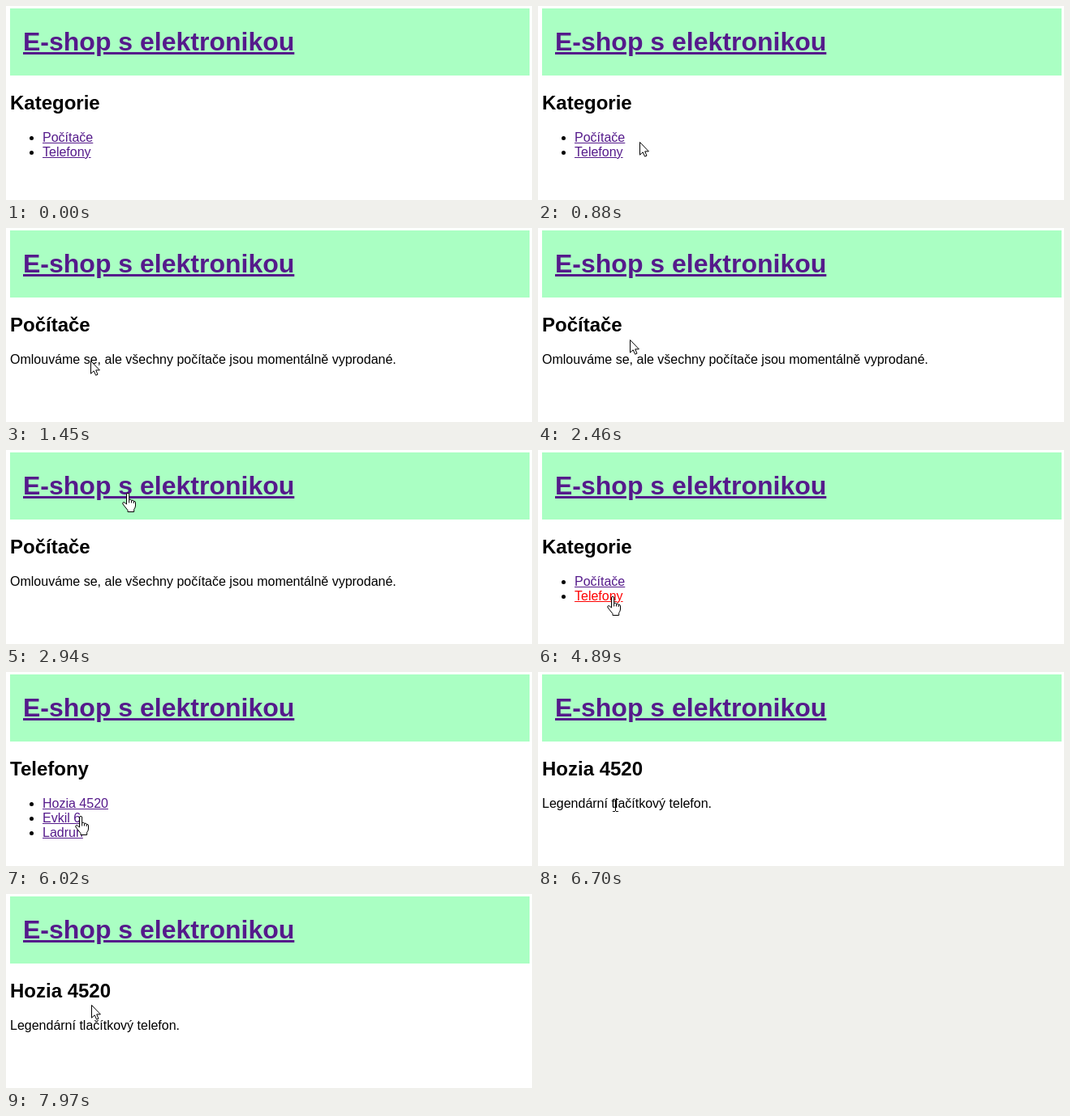
Recreate the animation shown at these times as an HTML page. Size 648x240 px, loop 8 s.

```html
<!DOCTYPE html>
<html lang="cs">
<head>
<meta charset="utf-8">
<title>E-shop</title>
<style>
  html, body { margin: 0; width: 100%; height: 100%; overflow: hidden; background: #fff; }
  #stage { position: relative; width: 648px; height: 240px; overflow: hidden;
    font: 16px/18px "Liberation Sans", Arial, sans-serif; color: #000; cursor: default; }
  #stage > * { position: absolute; margin: 0; white-space: nowrap; }
  header { left: 5px; top: 3px; width: 640px; height: 83px; background: #aaffc3; }
  h1 { left: 21px; top: 26px; font-size: 32px; line-height: 36px; }
  h2 { left: 5px; top: 106px; font-size: 24px; line-height: 27px; }
  #body { left: 5px; top: 154px; }
  ul { margin: 0; padding-left: 40px; }
  a { color: #551a8b; text-decoration: underline; }
  a.active { color: #f00; }
  svg { left: 0; top: 0; }
</style>
</head>
<body>
<div id="stage">
  <header></header>
  <h1><a id="home">E-shop s elektronikou</a></h1>
  <h2 id="heading"></h2>
  <div id="body"></div>
  <svg width="648" height="240" stroke="#000" fill="#fff">
    <g id="arrow">
      <path d="M.5 .5V16.2L4.2 12.8L6.6 18.2L9 17.2L6.7 11.9H11.4Z"/>
    </g>
    <g id="hand" stroke-linejoin="round">
      <path d="M5.5 14V2a1.6 1.6 0 0 1 3.2 0V8.5q2.4-1 2.8.8q2.4-.7 2.7 1q2.3-.3 2.3 1.7V16q0 2-1.8 4.5V23.5H7V21.5L1 14q-1-2 1-2.4q1.5 0 3.5 2.6Z"/>
      <path d="M8.7 8.5V12.5M11.5 9.5V12.5M14.2 10.5V13" fill="none"/>
    </g>
    <g id="beam" fill="none">
      <path d="M-3 -7.5H0M1 -7.5H4M.5 -7V7M-3 7.5H0M1 7.5H4"/>
    </g>
  </svg>
</div>
<script>
const LOOP = 8000;
const $ = id => document.getElementById(id);
const list = items => `<ul>${items.map(s => `<li><a>${s}</a></li>`).join('')}</ul>`;

const pages = {
  home: { title: 'Kategorie', links: ['Počítače', 'Telefony'] },
  computers: { title: 'Počítače', text: 'Omlouváme se, ale všechny počítače jsou momentálně vyprodané.' },
  phones: { title: 'Telefony', links: ['Hozia 4520', 'Evkil 6', 'Ladrun'] },
  detail: { title: 'Hozia 4520', text: 'Legendární tlačítkový telefon.' }
};

// Link -1 is the page header.
const clicks = [
  { down: 1220, up: 1330, load: 1415, link: 0, page: 'computers' },
  { down: 3360, up: 3460, load: 3555, link: -1, page: 'home' },
  { down: 4890, up: 5060, load: 5125, link: 1, page: 'phones' },
  { down: 6500, up: 6630, load: 6670, link: 0, page: 'detail' }
];

const smooth = u => u * u * (3 - 2 * u);
const easeOut = u => 1 - (1 - u) ** 1.6;

// Quadratic curves: from, control, to.
const moves = [
  { t0: 270, t1: 1080, ease: easeOut, pts: [[318, 238], [200, 182], [104, 163.5]] },
  { t0: 2235, t1: 2940, ease: smooth, pts: [[104, 163.5], [122, 112], [149, 53]] },
  { t0: 3935, t1: 4610, ease: easeOut, pts: [[149, 53], [124, 125], [91, 181]] },
  { t0: 5980, t1: 6330, ease: easeOut, pts: [[91, 181], [92, 173], [95, 165]] },
  { t0: 7705, t1: 7970, ease: smooth, pts: [[95, 165], [100, 152], [104.5, 136.5]] }
];

const bezier = ([a, b, c], s) => [0, 1].map(i =>
  (1 - s) ** 2 * a[i] + 2 * s * (1 - s) * b[i] + s * s * c[i]);

function pointerAt(t) {
  const move = moves.filter(m => t >= m.t0).pop();
  if (!move) return null;
  return bezier(move.pts, move.ease(Math.min(1, (t - move.t0) / (move.t1 - move.t0))));
}

let shown = '';
function showPage(name) {
  if (name === shown) return;
  shown = name;
  const page = pages[name];
  $('heading').textContent = page.title;
  $('body').innerHTML = page.links ? list(page.links) : page.text;
}

function cursorShape(t, x, y) {
  // The arrow stays after the first page load until the mouse moves.
  if (t >= clicks[0].load && t < moves[1].t0) return 'arrow';
  const inside = el => {
    const r = el.getBoundingClientRect();
    return x >= r.left && x <= r.right && y >= r.top && y <= r.bottom;
  };
  if ([...document.querySelectorAll('a')].some(inside)) return 'hand';
  if (inside($('heading')) || (!pages[shown].links && inside($('body')))) return 'beam';
  return 'arrow';
}

function render(t) {
  const last = clicks.filter(c => t >= c.load).pop();
  showPage(last ? last.page : 'home');

  const pressed = clicks.find(c => t >= c.down && t < c.up);
  $('home').classList.toggle('active', !!pressed && pressed.link < 0);
  $('body').querySelectorAll('a').forEach((a, i) =>
    a.classList.toggle('active', !!pressed && pressed.link === i));

  const pos = pointerAt(t);
  const shape = pos && cursorShape(t, ...pos);
  for (const id of ['arrow', 'hand', 'beam']) {
    $(id).style.display = id === shape ? '' : 'none';
  }
  if (pos) {
    const [x, y] = pos.map(Math.round);
    $(shape).setAttribute('transform', `translate(${shape === 'hand' ? x - 6 : x} ${y})`);
  }
}

function tick() {
  render(performance.now() % LOOP);
  requestAnimationFrame(tick);
}
tick();
</script>
</body>
</html>
```
